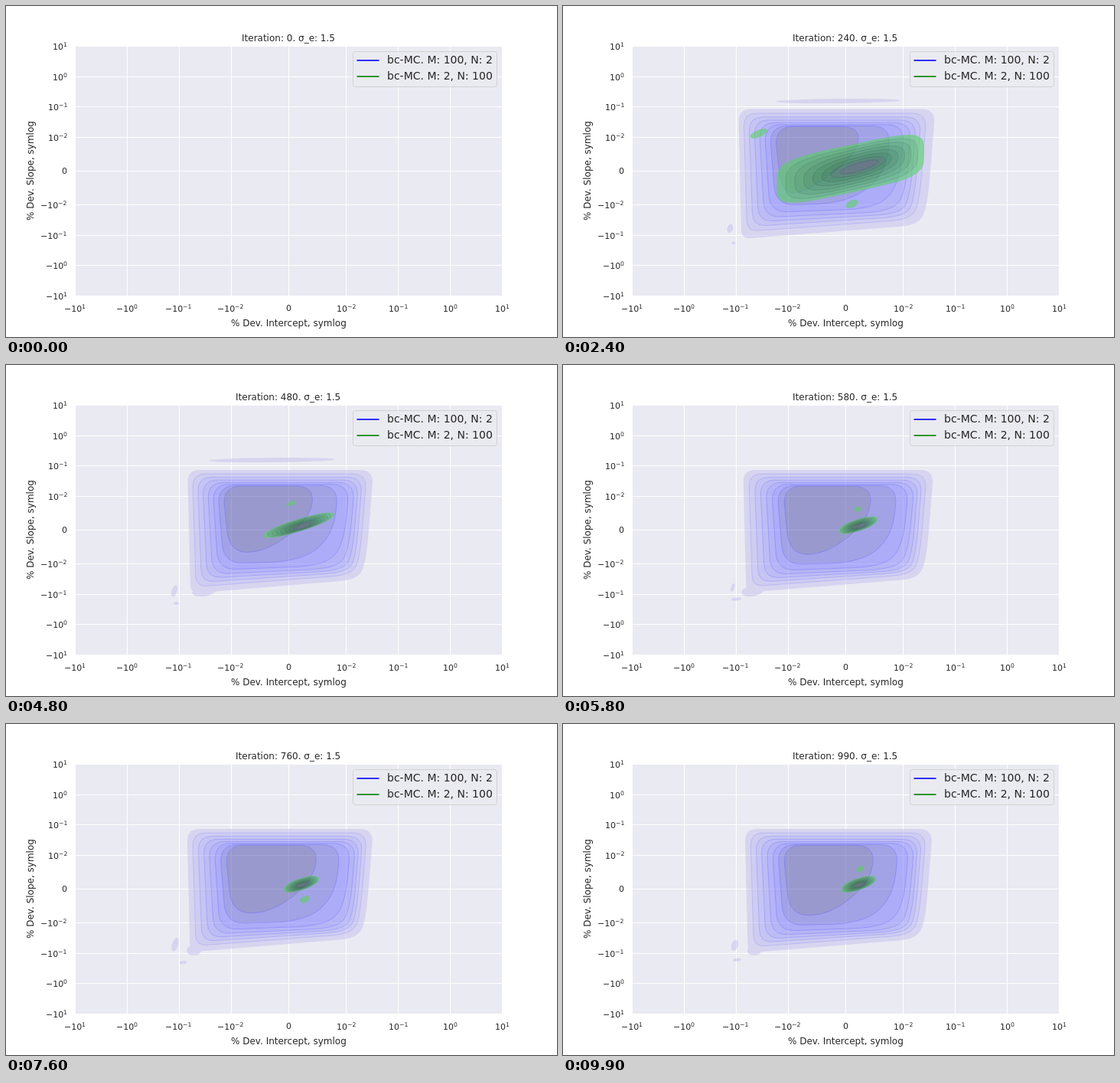
Recreate the animation shown at these times as an HTML page with a canvas. Size 720 by 432 pixels, loop 10000 ms.

```html
<!DOCTYPE html>
<html lang="en">
<head>
<meta charset="utf-8">
<title>Density of deviations</title>
<style>
html, body { margin: 0; width: 720px; height: 432px; overflow: hidden; background: #fff; }
canvas { display: block; }
</style>
</head>
<body>
<canvas id="stage" width="720" height="432"></canvas>
<script>
const ctx = document.getElementById('stage').getContext('2d');
const layer = document.createElement('canvas');
layer.width = 720;
layer.height = 432;
const lc = layer.getContext('2d');

const LEVELS = 8;
const BLUE = { ramp: [[196, 192, 238], [108, 108, 255], [74, 74, 172]], line: '#00f', alpha: .5 };
const GREEN = { ramp: [[85, 212, 95], [25, 130, 35], [60, 90, 65]], line: '#004a00', alpha: .57 };

const mix = (a, b, u) => a + (b - a) * u;
const mixAll = (a, b, u) => a.map((v, i) => mix(v, b[i], u));
const fade = (step, middle) => 1 / (1 + Math.exp((step - middle) / 4));

function seeded(seed) {
  return (low, high) => {
    const v = Math.sin(++seed * 127.1) * 43758.5453;
    return mix(low, high, v - Math.floor(v));
  };
}

function shade(ramp, s) {
  const c = s < .75 ? mixAll(ramp[0], ramp[1], s / .75) : mixAll(ramp[1], ramp[2], (s - .75) * 4);
  return `rgb(${c.map(Math.round)})`;
}

// Closed polygon with softened corners; each point is [x, y, radius]
function softPolygon(points) {
  const n = points.length;
  points.forEach(([x, y, radius], i) => {
    const toward = ([px, py]) => {
      const u = Math.min(radius / Math.hypot(px - x, py - y), .5);
      return [mix(x, px, u), mix(y, py, u)];
    };
    lc.lineTo(...toward(points[(i + n - 1) % n]));
    lc.quadraticCurveTo(x, y, ...toward(points[(i + 1) % n]));
  });
}

// Contours crowd near the rim, the last ones jump inward
const crowd = (share, s) => share * s ** .7 + (1 - share) * s ** 7;

function blueContour({ outer, inner, corner }, s) {
  const l = mix(outer.l, inner.l, s);
  const t = mix(outer.t, inner.t, 1 - (1 - s) ** 1.8);
  const r = mix(outer.r, inner.r, crowd(.45, s));
  const b = mix(outer.b, inner.b, crowd(.65, s));
  const cut = corner * s ** 4.5, w = r - l, h = b - t, slant = 9 * (1 - s);
  softPolygon([
    [l, t, 16 + 10 * s],
    [r, t, 18 + 8 * s],
    [r - w * .04, b - h * (.2 + .7 * cut), 40],
    [r - w * (.09 + cut), b - slant, 22 + 25 * s],
    [l + 4 + 5 * s, b + slant, 12 + 16 * s]
  ]);
}

function greenContour({ outer, inner, power }, s) {
  const [cx, cy, w, h, slope] = mixAll(outer, inner, s);
  const e = mix(power, 1, s);
  const bend = v => Math.sign(v) * Math.abs(v) ** e;
  for (let a = 0; a < 64; a++) {
    const x = w * bend(Math.cos(a * Math.PI / 32));
    lc.lineTo(cx + x, cy + slope * x + h * bend(Math.sin(a * Math.PI / 32)));
  }
}

function drawDensity(style, contour, pose) {
  lc.clearRect(0, 0, 720, 432);
  lc.strokeStyle = style.line;
  lc.fillStyle = shade(style.ramp, 0);
  for (const [x, y, rx, ry, turn] of pose.islands) {
    lc.beginPath();
    lc.ellipse(x, y, rx, ry, turn, 0, 7);
    lc.fill();
  }
  for (let i = 0; i < LEVELS; i++) {
    const s = i / (LEVELS - 1);
    lc.beginPath();
    contour(pose, s);
    lc.closePath();
    lc.fillStyle = shade(style.ramp, s);
    lc.fill();
    lc.globalAlpha = i && .2 + .35 * s;
    lc.stroke();
    lc.globalAlpha = 1;
  }
  ctx.globalAlpha = style.alpha;
  ctx.drawImage(layer, 0, 0);
  ctx.globalAlpha = 1;
}

// The blue cloud settles early and then only trembles
function bluePose(step) {
  const rnd = seeded(step * 31);
  const early = fade(step, 31), burst = Math.exp(-step / 6), settle = Math.exp(-step / 18);
  const islands = [
    [rnd(222, 232), rnd(304, 312), rnd(2, 7), 2, -.1],
    [rnd(218, 226), rnd(285, 295), rnd(2, 5), rnd(4, 11), .3],
    [rnd(245, 260), 295, rnd(8, 16), 7, -.15]
  ];
  if (step < 50 && rnd(0, 1) > .5) islands.push([rnd(345, 367), 124, rnd(80, 95), 3, -.01]);
  return {
    outer: {
      l: 237 - 9 * early + rnd(-2, 2), t: 137 - 3 * early,
      r: 482 + 5 * early + 40 * burst + rnd(-3, 3), b: 289 + 7 * early + rnd(-1, 1)
    },
    inner: {
      l: 288 - 50 * settle + rnd(-3, 3), t: 158 - 3 * settle,
      r: 408 - 70 * settle + rnd(-3, 3), b: 247 - 8 * settle + rnd(-3, 3)
    },
    corner: .4 + .5 * settle,
    islands
  };
}

// The green cloud flattens first, then shortens to a small lens
function greenPose(step) {
  const rnd = seeded(step * 53 + 7);
  const tall = fade(step, 31), wide = fade(step, 45), burst = Math.exp(-step / 6);
  const w = 23 + 72 * wide + 90 * burst, h = 8 + 27 * tall + 15 * burst;
  const core = 8 + 10 * wide + 80 * Math.exp(-step / 10);
  const x = 386 - 11 * wide + 25 * burst, y = 209 + 4 * tall;
  const island = side => [x - w * rnd(0, 1.3) * wide + rnd(-3, 6), y + side * (20 + 26 * wide),
    rnd(3, 7) + 6 * tall, rnd(2, 5), -.4];
  return {
    outer: [x, y, w, h, -.3 + .1 * tall],
    inner: [387, 210, core, 1 + core * .18, -.29],
    power: .9 - .5 * tall,
    islands: rnd(0, 1) < wide ? [island(-1), island(1)] : [island(rnd(0, 1) < .5 ? -1 : 1)]
  };
}

function text(str, x, y, size, share = .5) {
  ctx.font = `${size}px "DejaVu Sans", sans-serif`;
  ctx.fillStyle = '#262626';
  ctx.fillText(str, Math.round(x - ctx.measureText(str).width * share), y);
}

// Tick n runs from -4 to 4 on a symmetric log scale
const offset = (n, half) => n && Math.sign(n) * (Math.abs(n) - 1 + 10 / 9) * half / (3 + 10 / 9);
const tickX = n => 369 + offset(n, 279);
const tickY = n => 215 - offset(n, 163);

function tickLabel(n, x, y, share) {
  if (!n) return text('0', x, y - 1, 11, share);
  const base = n < 0 ? '−10' : '10';
  const power = String(Math.abs(n) - 3).replace('-', '−');
  const width = (str, size) => {
    ctx.font = `${size}px "DejaVu Sans", sans-serif`;
    return ctx.measureText(str).width;
  };
  const baseWidth = width(base, 11);
  const left = Math.round(x - (baseWidth + width(power, 7.7)) * share);
  text(base, left, y, 11, 0);
  text(power, left + baseWidth, y - 4, 7.7, 0);
}

function drawAxes() {
  ctx.fillStyle = '#fff';
  ctx.fillRect(0, 0, 720, 432);
  ctx.fillStyle = '#eaeaf2';
  ctx.fillRect(90, 52, 558, 326);
  for (let n = -4; n <= 4; n++) {
    const x = Math.round(tickX(n)), y = Math.round(tickY(n));
    ctx.fillStyle = '#fff';
    ctx.fillRect(x, 52, 1, 326);
    ctx.fillRect(90, y, 558, 1);
    tickLabel(n, tickX(n), 399, .5);
    tickLabel(n, 80, y + 5, 1);
  }
  text('% Dev. Intercept, symlog', 369, 418, 12);
  ctx.save();
  ctx.translate(36, 215);
  ctx.rotate(-Math.PI / 2);
  text('% Dev. Slope, symlog', 0, 0, 12);
  ctx.restore();
}

function drawLegend() {
  ctx.globalAlpha = .8;
  ctx.beginPath();
  ctx.roundRect(453.5, 59.5, 188, 46, 3);
  ctx.fillStyle = '#eaeaf2';
  ctx.fill();
  ctx.strokeStyle = '#ccc';
  ctx.lineWidth = 1;
  ctx.stroke();
  ctx.globalAlpha = 1;
  const entry = (color, label, y) => {
    ctx.fillStyle = color;
    ctx.fillRect(458.5, y - .8, 29, 1.6);
    text(label, 498, y + 4, 14, 0);
  };
  entry('blue', 'bc-MC. M: 100, N: 2', 71);
  entry('green', 'bc-MC. M: 2, N: 100', 92);
}

const start = performance.now();
function draw() {
  const step = Math.floor((performance.now() - start) % 10000 / 100);
  drawAxes();
  if (step) {
    drawDensity(BLUE, blueContour, bluePose(step));
    drawDensity(GREEN, greenContour, greenPose(step));
  }
  drawLegend();
  text(`Iteration: ${step * 10}. σ_e: 1.5`, 369, 46, 12);
  requestAnimationFrame(draw);
}
draw();
</script>
</body>
</html>
```
